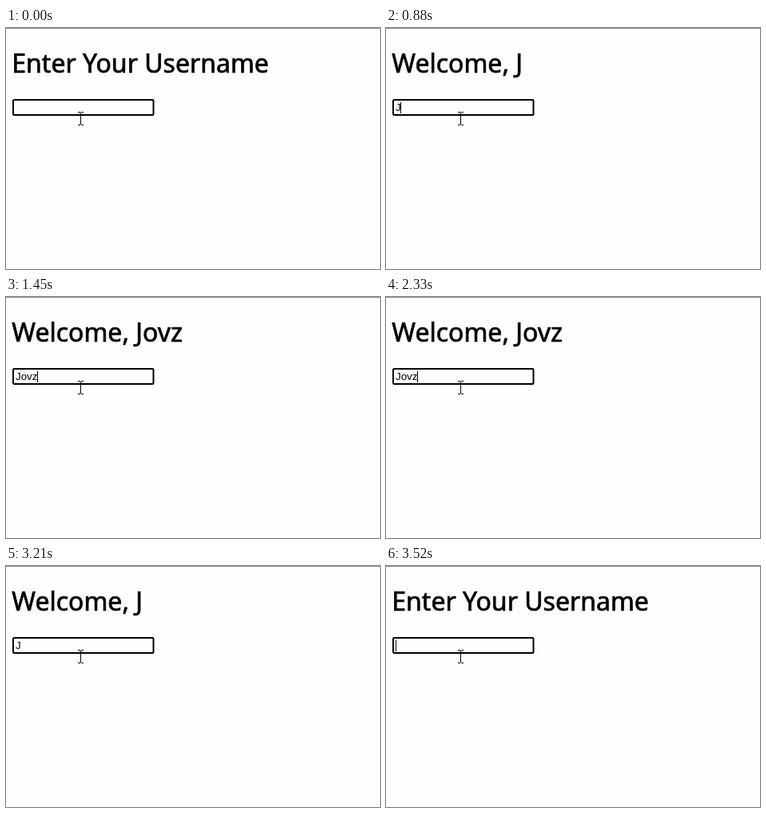
An HTML page that plays this animation: 468x302 px, repeating every 3700 ms.

```html
<!DOCTYPE html>
<html lang="en">
<head>
<meta charset="utf-8">
<title>Username greeting</title>
<style>
  html, body { margin: 0; width: 100%; height: 100%; overflow: hidden; background: #fefefe; }
  svg { display: block; width: 468px; height: 302px; }
  #heading { font: 32px "Noto Sans", "Open Sans", sans-serif; stroke: #000; stroke-width: 0.7px; }
  #value { font: 13.333px "Liberation Sans", Arial, sans-serif; }
</style>
</head>
<body>
<svg viewBox="0 0 468 302">
  <rect width="468" height="302" fill="#fefefe"/>
  <rect width="468" height="1" fill="#8c8c8c"/>
  <text id="heading" x="7.3" y="56"></text>
  <rect x="9" y="90" width="175.5" height="19" rx="1.5" fill="#fefefe" stroke="#000" stroke-width="2"/>
  <text id="value" x="12" y="104"></text>
  <rect id="caret" y="93" width="1" height="14"/>
  <!-- text pointer -->
  <path d="M90 105.5H93M94 105.5H97M93.5 106V121M90 121.5H93M94 121.5H97"
        fill="none" stroke="#000" stroke-width="1"/>
</svg>
<script>
  const LOOP = 3700;
  const NAME = "Jovz";
  const FIELD_X = 12;
  // [time in ms, letters in the field]
  const LETTERS = [[0, 0], [880, 1], [970, 2], [1060, 3], [1270, 4], [2970, 3], [3060, 2], [3150, 1], [3330, 0]];
  // [time in ms, caret visible]
  const BLINKS = [[0, 0], [550, 1], [1850, 0], [2330, 1], [2880, 0], [3330, 1]];

  const heading = document.getElementById("heading");
  const value = document.getElementById("value");
  const caret = document.getElementById("caret");

  const stateAt = (steps, t) => steps.filter(([start]) => start <= t).pop()[1];

  function render(t) {
    const typed = NAME.slice(0, stateAt(LETTERS, t));
    heading.textContent = typed ? `Welcome, ${typed}` : "Enter Your Username";
    value.textContent = typed;
    const width = typed ? value.getComputedTextLength() : 0;
    caret.setAttribute("x", Math.floor(FIELD_X + width));
    caret.setAttribute("visibility", stateAt(BLINKS, t) ? "visible" : "hidden");
  }

  const begin = performance.now();
  function tick() {
    render((performance.now() - begin) % LOOP);
    requestAnimationFrame(tick);
  }
  tick();
</script>
</body>
</html>
```
